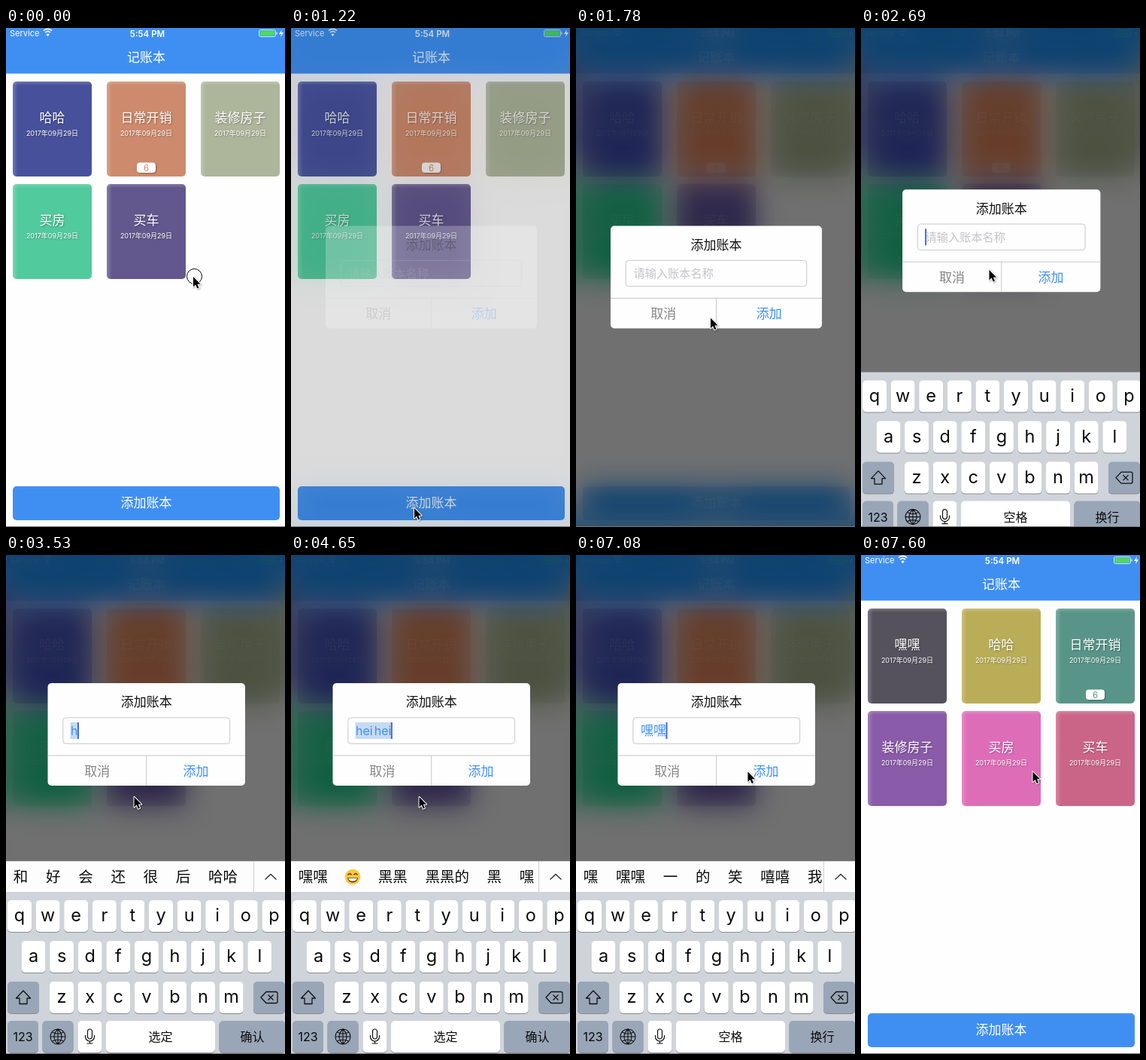
Recreate the animation shown at these times as an HTML page with a canvas. Size 371x662 px, loop 8000 ms.

```html
<!DOCTYPE html>
<html lang="zh">
<head>
<meta charset="utf-8">
<style>
html, body { margin: 0; width: 100%; height: 100%; overflow: hidden; background: #fefefe; }
canvas { display: block; }
</style>
</head>
<body>
<canvas id="stage" width="371" height="662"></canvas>
<script>
const W = 371, H = 662, LOOP = 8000;
const BLUE = '#3f8ff3', CARET = '#4767e0';
const KEYS_TOP = 447, BAR_HEIGHT = 41, KEYBOARD_HEIGHT = H - KEYS_TOP;
const SAVE_AT = 7160;

const makeLayer = () => Object.assign(document.createElement('canvas'), { width: W, height: H }).getContext('2d');
const screen = document.getElementById('stage').getContext('2d');
const page = makeLayer(), dim = makeLayer();
let g = screen;

const ramp = (t, from, to) => Math.min(1, Math.max(0, (t - from) / (to - from)));
const easeOut = u => 1 - (1 - u) ** 3;
const smooth = u => u * u * (3 - 2 * u);
const mix = (a, b, u) => a + (b - a) * u;

// ---- drawing helpers ----
function text(str, x, y, size, color, align = 'center', weight = 400) {
  g.font = `${weight} ${size}px Inter, "Noto Sans CJK SC", sans-serif`;
  g.textAlign = align;
  g.fillStyle = color;
  g.fillText(str, x, y + size * 0.37);
  return g.measureText(str).width;
}

function rect(x, y, w, h, color) {
  g.fillStyle = color;
  g.fillRect(x, y, w, h);
}

function box(x, y, w, h, r, fill, stroke) {
  g.beginPath();
  g.roundRect(x, y, w, h, r);
  if (fill) { g.fillStyle = fill; g.fill(); }
  if (stroke) { g.strokeStyle = stroke; g.lineWidth = 1; g.stroke(); }
}

function line(d, x, y, color = '#111', width = 1.3) {
  g.save();
  g.translate(x, y);
  g.strokeStyle = color;
  g.lineWidth = width;
  g.lineJoin = 'round';
  g.stroke(new Path2D(d));
  g.restore();
}

function shape(d, x, y, color) {
  g.save();
  g.translate(x, y);
  g.fillStyle = color;
  g.fill(new Path2D(d));
  g.restore();
}

function shadow(color, blur, offset) {
  g.shadowColor = color;
  g.shadowBlur = blur;
  g.shadowOffsetX = g.shadowOffsetY = offset;
}

// ---- account book page ----
const before = [
  ['哈哈', '#47519b'], ['日常开销', '#cd8a6c', 6], ['装修房子', '#adb59b'],
  ['买房', '#51ca9e'], ['买车', '#62588e']
];
const after = [
  ['嘿嘿', '#55515d'], ['哈哈', '#baad57'], ['日常开销', '#589588', 6],
  ['装修房子', '#8a5ba8'], ['买房', '#de6db8'], ['买车', '#cb6587']
];

function statusBar() {
  text('Service', 5, 7.3, 11, '#fff', 'left');
  line('M-5.5-4.5A8 8 0 0 1 5.5-4.5M-3.5-2A5 5 0 0 1 3.5-2', 55.5, 8, '#fff', 1.7);
  shape('M-2.2 0A3 3 0 0 1 2.2 0L0 2.6Z', 55.5, 8.6, '#fff');
  text('5:54 PM', 188, 7.3, 11.5, '#fff', 'center', 600);
  box(336.5, 2.5, 22, 9, 2, null, '#cfe2fb');
  box(337.5, 3.5, 20, 7, 1, '#4cd964');
  rect(359.5, 5.5, 1.3, 3, '#cfe2fb');
  shape('M1-5L-3 1H0L-1 5L3-1H0Z', 366, 7, '#fff');
}

function card([title, color, count], i) {
  const x = 9 + 125 * (i % 3), y = 71 + 136 * Math.floor(i / 3), cx = x + 52.5;
  box(x, y, 105, 126, 5, color);
  for (const [dx, dy] of [[7, 0], [0, 5]]) {
    const sheen = g.createLinearGradient(x, y, x + dx, y + dy);
    sheen.addColorStop(0, 'rgba(255,255,255,.22)');
    sheen.addColorStop(1, 'rgba(255,255,255,0)');
    box(x, y, 105, 126, 5, sheen);
  }
  g.save();
  shadow('rgba(0,0,0,.3)', 2, 1);
  text(title, cx, y + 48, 17, '#fff', 'center', 300);
  text('2017年09月29日', cx, y + 69, 9, '#fff');
  if (count) box(cx - 12.5, y + 107.5, 25, 13.5, 4, '#fff');
  g.restore();
  if (count) text(count, cx, y + 114.3, 11.5, color);
}

function drawPage(cards) {
  rect(0, 0, W, H, '#fefefe');
  rect(0, 0, W, 60.5, BLUE);
  statusBar();
  text('记账本', 186.5, 39, 17, '#fff', 'center', 300);
  cards.forEach(card);
  box(9, 608, 355, 45, 5, BLUE);
  text('添加账本', 186.5, 630, 17, '#fff', 'center', 300);
}

// The enlarged copy underneath keeps the blur from fading out at the screen edges.
function drawBackdrop(alpha) {
  dim.filter = 'blur(18px) saturate(1.6) brightness(.414)';
  for (const pad of [40, 0]) {
    dim.drawImage(page.canvas, -pad, -pad, W + 2 * pad, H + 2 * pad);
  }
  g.globalAlpha = alpha * 0.95;
  g.drawImage(dim.canvas, 0, 0);
  g.globalAlpha = 1;
}

// ---- typing: start time, field text, suggestions ----
const typing = [
  [3380, 'h', '和 好 会 还 很 后 哈哈'],
  [3730, 'he', '和 很 喝 何 合 河 黑'],
  [3960, 'hei', '黑 嘿 黑色 黑人 嘿嘿 黑白'],
  [4350, 'hei h', '黑户 黑好 嘿哈 黑会 黑 嘿'],
  [4470, 'hei he', '嘿嘿 黑河 黑黑 黑盒 黑 嘿'],
  [4650, 'hei hei', '嘿嘿 😁 黑黑 黑黑的 黑 嘿'],
  [5030, '嘿嘿', '嘿 嘿嘿 一 的 笑 嘻嘻 我']
];
const isMarked = t => t >= 3380 && t < 5030;

function caretAlpha(t) {
  if (t < 2500) return 0;
  if (t >= 3380 && t < 5090) return 1;
  const phase = (t - (t < 3380 ? 2500 : 5090)) % 1000;
  return phase < 700 ? 1 - ramp(phase, 480, 600) : ramp(phase, 890, 990);
}

function drawDialog(t, alpha, raised, bar, entry) {
  const w = mix(281, 262.5, raised), x = mix(46, 55.5, raised);
  const y = mix(262.5, 212, raised) - 42 * bar;
  const mid = x + w / 2, left = x + 30;
  g.globalAlpha = alpha;
  box(x, y, w, 136, 5, '#fefefe');
  text('添加账本', mid, y + 25, 17, '#111');
  box(x + 20.3, y + 45.8, w - 40.6, 34.5, 4, null, '#c8c8cc');
  rect(x, y + 95.5, w, 1, '#c8c8cc');
  rect(mid - 0.5, y + 96, 1, 40, '#c8c8cc');
  text('取消', x + w / 4, y + 116.5, 17, '#858585');
  text('添加', x + w * 3 / 4, y + 116.5, 17, BLUE);

  let end = left;
  if (!entry) {
    text('请输入账本名称', left + 0.5, y + 63, 15.2, '#c4c4c9', 'left');
  } else {
    const size = isMarked(t) ? 16 : 17;
    g.wordSpacing = '-2.5px';
    g.font = `400 ${size}px Inter, "Noto Sans CJK SC", sans-serif`;
    end += g.measureText(entry[1]).width;
    if (isMarked(t)) rect(left, y + 52, end - left + 1, 22, '#c6daf3');
    text(entry[1], left + 0.5, y + 63, size, BLUE, 'left');
    g.wordSpacing = '0px';
  }
  g.globalAlpha = alpha * caretAlpha(t);
  rect(end, y + 52, 2, 22, CARET);
  g.globalAlpha = 1;
}

// ---- keyboard ----
function key(x, y, w, label, { fill = '#fff', size = 16, dy = 21.5 } = {}) {
  box(x, y + 1, w, 42, 5, '#898c91');
  box(x, y, w, 42, 5, fill);
  if (label) text(label, x + w / 2, y + dy, size, '#0b0b0b');
}

function grin(x, y) {
  g.fillStyle = '#fdc93a';
  g.beginPath();
  g.arc(x, y, 10.3, 0, 7);
  g.fill();
  line('M-6.5-2.5Q-4-6-1.5-2.5M1.5-2.5Q4-6 6.5-2.5', x, y, '#5b3a12', 1.5);
  shape('M-7 1H7Q6 7.5 0 7.5T-7 1Z', x, y, '#5b3a12');
  shape('M-6 1.7H6Q5 5.8 0 5.8T-6 1.7Z', x, y, '#fff');
}

function drawSuggestions(y, list) {
  rect(0, y, W, BAR_HEIGHT, '#fdfdfe');
  rect(0, y, W, 0.6, '#c3c6cb');
  g.save();
  g.beginPath();
  g.rect(0, y, 329, BAR_HEIGHT);
  g.clip();
  let x = 9.8;
  for (const word of list.split(' ')) {
    if (word === '😁') {
      grin(x + 9.5, y + 21);
      x += 19.5;
    } else {
      x += text(word, x, y + 21, 19.5, '#0b0b0b', 'left');
    }
    x += 23.7;
  }
  g.restore();
  rect(329, y, 1, BAR_HEIGHT, '#cdcfd3');
  line('M-7.5 3.5L0-3.5L7.5 3.5', 352, y + 21, '#222', 1.2);
}

function drawKeyboard(top, marked) {
  const grey = { fill: '#99a6b7' }, pitch = 37.6;
  rect(0, top, W, KEYBOARD_HEIGHT + 1, '#cfd3da');
  [['qwertyuiop', 2], ['asdfghjkl', 20.5], ['zxcvbnm', 58]].forEach(([letters, x], row) => {
    [...letters].forEach((c, i) =>
      key(x + pitch * i, top + 11 + 54 * row, 32, c, { size: 23.5, dy: 19.5 }));
  });
  const y3 = top + 119, y4 = top + 171;
  key(2, y3, 42, '', grey);
  line('M0-9L9.5 1H5V8.5H-5V1H-9.5Z', 23, y3 + 21);
  key(329, y3, 42, '', grey);
  line('M-11 0L-4-7.5H9Q11-7.5 11-5.5V5.5Q11 7.5 9 7.5H-4ZM-1.5-3.5L5.5 3.5M5.5-3.5L-1.5 3.5', 350, y3 + 21);
  key(2, y4, 41, '123', grey);
  key(48.5, y4, 41, '', grey);
  line('M-10 0A10 10 0 1 1 10 0A10 10 0 1 1-10 0H10M0-10V10M0-10Q-10 0 0 10Q10 0 0-10M-7.5-6Q0-2 7.5-6M-7.5 6Q0 2 7.5 6',
    69, y4 + 21, '#111', 1.1);
  key(95.5, y4, 32, '');
  line('M-3-6A3 3 0 0 1 3-6V1A3 3 0 0 1-3 1ZM-6-1V1A6 6 0 0 0 6 1V-1M0 7V10M-4 10H4', 111.5, y4 + 20, '#111', 1.2);
  key(133, y4, 145, marked ? '选定' : '空格');
  key(283.5, y4, 88, marked ? '确认' : '换行', grey);
}

// ---- pointer: time, x, y ----
const path = [
  [450, 249, 330], [810, 164, 637], [1470, 164, 637], [1780, 179, 385], [1900, 176, 346],
  [2060, 164, 311], [2260, 170.5, 321], [6090, 170.5, 321], [6720, 228.5, 287.5]
];
const presses = [[0, 30], [1110, 1170], [2410, 2480], [6930, 7060]];

function drawPointer(t) {
  const next = path.findIndex(p => p[0] > t);
  const b = path.at(next), a = next > 0 ? path[next - 1] : b;
  const raw = a === b ? 0 : ramp(t, a[0], b[0]);
  const u = next === 3 ? raw ** 1.3 : next === 4 ? raw : smooth(raw);
  const x = mix(a[1], b[1], u), y = mix(a[2], b[2], u);
  if (presses.some(([from, to]) => t >= from && t < to)) {
    g.strokeStyle = '#000';
    g.lineWidth = 1;
    g.beginPath();
    g.arc(x + 1.5, y - 0.5, 10, 0, 7);
    g.stroke();
  }
  const arrow = 'M0 0V13.5L3.1 10.6L5.3 15.6L7.5 14.7L5.4 9.8H9.6Z';
  g.save();
  shadow('rgba(0,0,0,.3)', 2, 1);
  line(arrow, x, y, '#fff', 2);
  g.restore();
  shape(arrow, x, y, '#000');
}

function render(t) {
  const saved = t >= SAVE_AT;
  const leaving = ramp(t, SAVE_AT, 7590);
  const shown = ramp(t, 1150, 1440) * (1 - ramp(t, SAVE_AT, 7500));
  const raised = easeOut(ramp(t, 2480, 2807)) * (1 - smooth(leaving));
  const bar = easeOut(ramp(t, 3350, 3550)) * (t >= 3380);
  const entry = typing.findLast(e => t >= e[0]);

  g = page;
  drawPage(saved ? after : before);
  g = screen;
  g.drawImage(page.canvas, 0, 0);
  if (shown > 0) {
    drawBackdrop(shown);
    drawDialog(t, shown, raised, bar * (1 - smooth(leaving)), entry);
  }
  if (raised > 0) {
    const hidden = saved ? BAR_HEIGHT : 0;
    const top = H + hidden - (KEYBOARD_HEIGHT + hidden) * raised;
    if (entry) drawSuggestions(top - BAR_HEIGHT * bar, entry[2]);
    drawKeyboard(top, isMarked(t));
  }
  rect(0, 661, W, 1, '#777');
  drawPointer(t);
}

const start = performance.now();
function tick() {
  render((performance.now() - start) % LOOP);
  requestAnimationFrame(tick);
}
tick();
</script>
</body>
</html>
```
